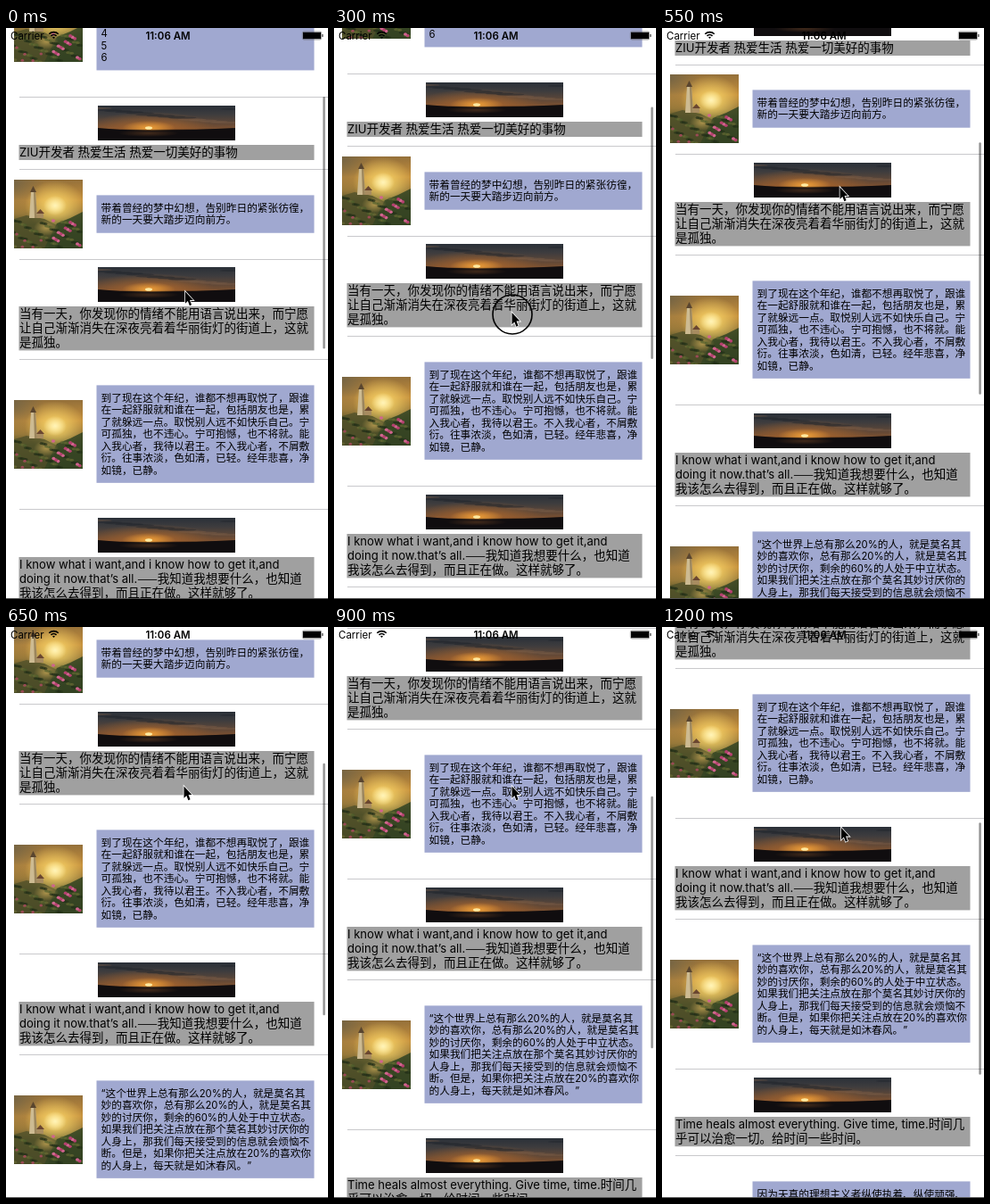
An HTML page with a canvas for the animation above (1250 ms loop, 361 by 640 pixels).

```html
<!DOCTYPE html>
<html lang="zh-CN">
<head>
<meta charset="utf-8">
<title>Scrolling list</title>
<style>
  html, body { margin: 0; width: 361px; height: 640px; overflow: hidden; background: #fff; }
  canvas { display: block; }
</style>
</head>
<body>
<canvas id="stage" width="361" height="640"></canvas>
<script>
const ctx = document.getElementById('stage').getContext('2d');
const W = 361, H = 640, LOOP = 1250, STEP = 50;
const LATIN = 'Inter, Roboto, sans-serif';
const HAN = '"Noto Sans CJK SC", "Noto Sans CJK", sans-serif';

const banner = (...lines) => ({ banner: true, lines, height: 64.3 + 16.2 * lines.length });
const post = (...lines) => ({ banner: false, lines, height: 74.1 + 13.42 * lines.length });

const cells = [
  post('1', '2', '3', '4', '5', '6'),
  banner('ZIU开发者 热爱生活 热爱一切美好的事物'),
  post('带着曾经的梦中幻想，告别昨日的紧张彷徨，', '新的一天要大踏步迈向前方。'),
  banner('当有一天，你发现你的情绪不能用语言说出来，而宁愿',
    '让自己渐渐消失在深夜亮着着华丽街灯的街道上，这就', '是孤独。'),
  post('到了现在这个年纪，谁都不想再取悦了，跟谁', '在一起舒服就和谁在一起，包括朋友也是，累',
    '了就躲远一点。取悦别人远不如快乐自己。宁', '可孤独，也不违心。宁可抱憾，也不将就。能',
    '入我心者，我待以君王。不入我心者，不屑敷', '衍。往事浓淡，色如清，已轻。经年悲喜，净', '如镜，已静。'),
  banner('I know what i want,and i know how to get it,and',
    'doing it now.that’s all.——我知道我想要什么，也知道', '我该怎么去得到，而且正在做。这样就够了。'),
  post('“这个世界上总有那么20%的人，就是莫名其', '妙的喜欢你，总有那么20%的人，就是莫名其',
    '妙的讨厌你，剩余的60%的人处于中立状态。', '如果我们把关注点放在那个莫名其妙讨厌你的',
    '人身上，那我们每天接受到的信息就会烦恼不', '断。但是，如果你把关注点放在20%的喜欢你',
    '的人身上，每天就是如沐春风。”'),
  banner('Time heals almost everything. Give time, time.时间几', '乎可以治愈一切。给时间一些时间。'),
  post('因为天真的理想主义者纵使执着、纵使顽强、', '', '', '', '', '', '', '')
];

// [time, value] keys
const scrollKeys = [[0, 0], [100, 11], [200, 20], [300, 26], [450, 65], [650, 173], [800, 226.4], [1000, 285], [1200, 325]];
const pointerX = [[0, 201], [250, 199.5], [1000, 199.5], [1200, 201]];
const pointerY = [[0, 295.5], [250, 320], [300, 319], [450, 235], [550, 178.5], [1000, 178.5], [1200, 225]];

// Monotone cubic interpolation
function track(keys, t) {
  const last = keys.length - 2;
  const slope = i => (keys[i + 1][1] - keys[i][1]) / (keys[i + 1][0] - keys[i][0]);
  const tangent = i => {
    if (i === 0) return slope(0);
    if (i > last) return slope(last);
    const a = slope(i - 1), b = slope(i);
    return a * b > 0 ? 2 * a * b / (a + b) : 0;
  };
  let i = 0;
  while (i < last && t >= keys[i + 1][0]) i++;
  const [t0, v0] = keys[i], [t1, v1] = keys[i + 1];
  const d = t1 - t0, u = Math.min((t - t0) / d, 1);
  return v0 + (v1 - v0) * u * u * (3 - 2 * u)
    + d * u * (1 - u) * ((1 - u) * tangent(i) - u * tangent(i + 1));
}

function rect(x, y, w, h, fill) {
  ctx.fillStyle = fill;
  ctx.fillRect(x, y, w, h);
}

function shape(points, fill) {
  ctx.fillStyle = fill;
  ctx.beginPath();
  points.forEach(([x, y]) => ctx.lineTo(x, y));
  ctx.closePath();
  ctx.fill();
}

function ellipse(x, y, rx, ry, fill) {
  ctx.fillStyle = fill;
  ctx.beginPath();
  ctx.ellipse(x, y, rx, ry, 0, 0, 7);
  ctx.fill();
}

function shade(gradient, ...stops) {
  stops.forEach(([at, color]) => gradient.addColorStop(at, color));
  return gradient;
}

function glow(x, y, rx, ry, color) {
  ctx.save();
  ctx.translate(x, y);
  ctx.scale(rx, ry);
  const fade = ctx.createRadialGradient(0, 0, 0, 0, 0, 1);
  rect(-1, -1, 2, 2, shade(fade, [0, color], [1, color.slice(0, 7) + '00']));
  ctx.restore();
}

function drawLine(text, x, y, size) {
  ctx.fillStyle = '#000';
  for (const run of text.match(/[ -~“”’]+|[^ -~“”’]+/g) || []) {
    ctx.font = /[ -~“”’]/.test(run) ? `${size * 0.968}px ${LATIN}` : `${size}px ${HAN}`;
    ctx.fillText(run, x, y);
    x += ctx.measureText(run).width;
  }
}

function picture(x, y, w, h, paint) {
  ctx.save();
  ctx.translate(x, y);
  ctx.beginPath();
  ctx.rect(0, 0, w, h);
  ctx.clip();
  paint(w, h);
  ctx.restore();
}

function lighthouse(w, h) {
  rect(0, 0, w, h, shade(ctx.createLinearGradient(0, 0, 0, h),
    [0, '#94703a'], [0.3, '#c58f3c'], [0.5, '#96783a'], [0.66, '#555529'], [1, '#2c331d']));
  glow(0, 4, 34, 34, '#6f6246cc');
  glow(46, 29, 34, 28, '#ffdc6cff');
  glow(46, 29, 13, 11, '#fff3b8ff');
  shape([[0, 44], [14, 40], [34, 44], [48, 51], [38, 77], [0, 77]], '#50502acc');
  shape([[77, 36], [63, 43], [48, 49], [34, 77], [77, 77]], '#344523dd');
  glow(36, 54, 14, 9, '#d9b35caa');
  shape([[19, 14], [24, 14], [26, 43], [17, 43]], '#cdbb92');
  shape([[22, 14], [24, 14], [26, 43], [23, 43]], '#9b855c');
  shape([[18, 14], [21.5, 7], [25, 14]], '#59452f');
  rect(26, 37, 7, 6, '#a88c60');
  shape([[25, 38], [29.5, 33], [34, 38]], '#6a4630');
  const foliage = ['#26351a', '#4c5e2b', '#1f2a17', '#6b6b35'];
  for (let i = 0; i < 90; i++) {
    const x = (i * 29.7) % w, y = 46 + (i * 17.9) % 31;
    ellipse(x, y, 2.2, 1.5, foliage[i % 4] + 'aa');
  }
  for (let i = 0; i < 15; i++) {
    ellipse(44 + (i * 18.7) % 32, 46 + (i * 11.3) % 29, 2, 1.8, i % 2 ? '#b5406f' : '#d0658e');
  }
  for (let i = 0; i < 5; i++) ellipse(3 + (i * 9.1) % 30, 61 + (i * 7.3) % 15, 1.8, 1.5, '#9a4a55');
}

function sunset(w, h) {
  rect(0, 0, w, h, shade(ctx.createLinearGradient(0, 0, 0, h),
    [0, '#2a3038'], [0.25, '#3d3c3e'], [0.48, '#5b4638'], [0.66, '#7a5031'], [0.7, '#1c1512'], [1, '#0c0a0b']));
  glow(60, 23, 70, 16, '#c9742aaa');
  glow(57, 25, 30, 8, '#ffae3ccc');
  for (let i = 0; i < 14; i++) {
    ellipse((i * 47.3) % w, 3 + (i * 5.3) % 17, 16, 1.2, i % 3 ? '#22262c77' : '#80604955');
  }
  ellipse(57, 25, 4, 1.8, '#ffe9a0');
  shape([[0, 25], [25, 27], [60, 27.5], [110, 27], [154, 25], [154, 39], [0, 39]], '#100d0f');
  glow(57, 31, 34, 4, '#6b422488');
}

function drawCell(cell, y) {
  rect(15, Math.round(y + cell.height), W - 15, 1, '#c9c9cc');
  if (cell.banner) {
    picture(103, y + 10, 154, 39, sunset);
    rect(14.5, y + 54, 331, cell.height - 63.5, '#a0a0a0');
    cell.lines.forEach((line, i) => drawLine(line, 15, y + 67 + i * 16.2, 13.5));
  } else {
    picture(9, Math.round(y + (cell.height - 77) / 2), 77, 77, lighthouse);
    rect(101.5, y + 29.4, 244, cell.height - 58.6, '#a0a8d0');
    cell.lines.forEach((line, i) => drawLine(line, 106.5, y + 48 + i * 13.42, 11.7));
  }
}

function drawStatusBar() {
  ctx.fillStyle = '#000';
  ctx.font = `11.5px ${LATIN}`;
  ctx.fillText('Carrier', 5, 12.5);
  ctx.font = `600 11.5px ${LATIN}`;
  ctx.textAlign = 'center';
  ctx.fillText('11:06 AM', 181.5, 12.5);
  ctx.textAlign = 'left';

  ctx.strokeStyle = '#000';
  ctx.lineWidth = 1.7;
  for (const r of [1.2, 4.3, 7.4]) {
    ctx.beginPath();
    ctx.arc(53.5, 12, r, -Math.PI * 0.75, -Math.PI * 0.25);
    ctx.stroke();
  }

  ctx.strokeStyle = '#666';
  ctx.lineWidth = 0.6;
  ctx.beginPath();
  ctx.roundRect(332.3, 4, 21.4, 9, 1.8);
  ctx.stroke();
  rect(333, 4.8, 20, 7.4, '#000');
  rect(354.3, 7, 1.2, 3, '#444');
}

function drawPointer(x, y, pressed) {
  if (pressed) {
    ctx.strokeStyle = '#000';
    ctx.lineWidth = 1.6;
    ctx.beginPath();
    ctx.arc(x + 0.5, y + 2, 22, 0, 7);
    ctx.stroke();
  }
  ctx.save();
  ctx.translate(x, y);
  ctx.scale(0.84, 0.92);
  ctx.beginPath();
  [[0, 0], [0, 14.5], [3.4, 11.4], [5.8, 17], [8.4, 15.9], [6, 10.4], [10.6, 10.4]]
    .forEach(([px, py]) => ctx.lineTo(px, py));
  ctx.closePath();
  ctx.strokeStyle = '#fff';
  ctx.lineWidth = 1.8;
  ctx.stroke();
  ctx.fillStyle = '#000';
  ctx.fill();
  ctx.restore();
}

function draw(t) {
  const scroll = track(scrollKeys, t);
  rect(0, 0, W, H, '#fff');
  let top = -77.6 - scroll;
  for (const cell of cells) {
    if (top < H && top + cell.height > 0) drawCell(cell, Math.round(top));
    top += cell.height;
  }

  ctx.fillStyle = 'rgba(0, 0, 0, 0.42)';
  ctx.beginPath();
  ctx.roundRect(355.3, 77 + scroll * 0.4376, 2.5, 282.5, 1.25);
  ctx.fill();

  drawStatusBar();
  rect(0, H - 1, W, 1, '#555');
  drawPointer(track(pointerX, t), track(pointerY, t), t >= 250 && t < 550);
}

function tick() {
  const t = performance.now() % LOOP;
  draw(Math.floor(t / STEP) * STEP);
  requestAnimationFrame(tick);
}
tick();
</script>
</body>
</html>
```
